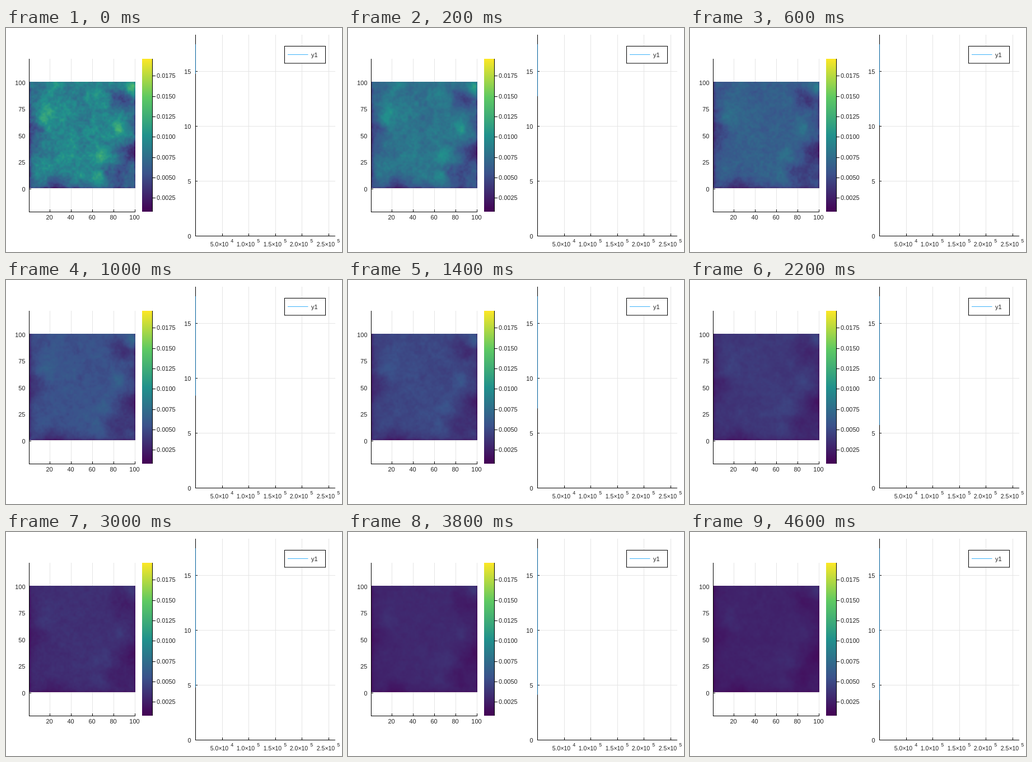
Write an HTML page with a canvas that moves like this. It is 600 by 400 pixels and loops after 4800 ms.

```html
<!DOCTYPE html>
<html lang="en">
<head>
<meta charset="utf-8">
<title>Heat map and history</title>
<style>
  html, body { margin: 0; width: 100%; height: 100%; overflow: hidden; background: #fff; }
  svg { position: absolute; left: 0; top: 0; }
  canvas { position: absolute; left: 42px; top: 96px; width: 189px; height: 190px; }
  text { font: 11px "Liberation Sans", Arial, sans-serif; fill: #222; }
  text.power { font-size: 10.5px; }
  text.exponent { font-size: 9px; }
</style>
</head>
<body>
<svg id="plot" width="600" height="400" viewBox="0 0 600 400"></svg>
<canvas id="heat" width="100" height="100"></canvas>
<script>
const STEP = 200, STEPS = 24, N = 100;
const GRID = '#e5e5e5';
const svg = document.getElementById('plot');
const ctx = document.getElementById('heat').getContext('2d');
const image = ctx.createImageData(N, N);

function add(tag, attrs, content = '', parent = svg) {
  const el = document.createElementNS('http://www.w3.org/2000/svg', tag);
  for (const key in attrs) el.setAttribute(key, attrs[key]);
  el.textContent = content;
  return parent.appendChild(el);
}
const line = (x1, y1, x2, y2, stroke = '#000') => add('line', { x1, y1, x2, y2, stroke });
const label = (x, y, content, anchor = 'start', cls = '') =>
  add('text', { x, y, 'text-anchor': anchor, class: cls }, content);
const mix = (a, b, t) => a + (b - a) * t;
const ease = t => t * t * (3 - 2 * t);

const viridis = ['#440154', '#3b528b', '#21918c', '#5ec962', '#fde725'];
const viridisRgb = viridis.map(hex => [1, 3, 5].map(i => parseInt(hex.slice(i, i + 2), 16)));

function colour(t) {
  const p = Math.min(0.9999, Math.max(0, t)) * (viridis.length - 1), i = Math.floor(p);
  return viridisRgb[i].map((c, j) => mix(c, viridisRgb[i + 1][j], p - i));
}

function drawLeftPlot() {
  for (let v = 20; v <= 100; v += 20) {
    const x = 40.5 + v * 1.9;
    line(x, 55, x, 328, GRID);
    line(x, 328, x, 324);
    label(x - 1, 342, v, 'middle');
  }
  for (let v = 0; v <= 100; v += 25) {
    const y = 287.5 - v * 1.9;
    line(42, y, 231, y, GRID);
    line(42, y, 45, y);
    label(34.5, y + 4.3, v, 'end');
  }
  line(41.5, 55, 41.5, 329);
  line(41, 328.5, 231, 328.5);
}

function drawColourBar() {
  const ramp = add('linearGradient', { id: 'ramp', x1: 0, x2: 0, y1: 1, y2: 0 });
  viridis.forEach((hex, i) =>
    add('stop', { offset: i / (viridis.length - 1), 'stop-color': hex }, '', ramp));
  add('rect', { x: 243, y: 55, width: 18, height: 273, fill: 'url(#ramp)' });
  line(261.5, 55, 261.5, 328);
  for (let i = 1; i <= 7; i++) {
    const y = Math.floor(340 - i * 36.33) + 0.5;
    line(262, y, 267, y);
    label(269, y + 3.5, (i * 0.0025).toFixed(4));
  }
}

function drawRightPlot() {
  for (let i = 1; i <= 5; i++) {
    const x = Math.round(338 + i * 47.55) + 0.5;
    line(x, 12, x, 372, GRID);
    line(x, 372, x, 367);
    label(x - 5.5, 390, (i === 1 ? '5.0' : (i / 2).toFixed(1)) + '×10', 'middle', 'power');
    label(x + 14.7, 383, i === 1 ? 4 : 5, 'start', 'exponent');
  }
  for (let v = 0; v <= 15; v += 5) {
    const y = 371.5 - v * 19.6;
    line(339, y, 588, y, GRID);
    line(339, y, 342, y);
    label(330.5, y + 4, v, 'end');
  }
  line(338.5, 12, 338.5, 372);
  line(338, 371.5, 588, 371.5);
  add('rect', { x: 497.5, y: 32.5, width: 73, height: 30.5, fill: '#fff', stroke: '#000' });
  line(503, 47.5, 539.5, 47.5, '#009af9').setAttribute('opacity', 0.75);
  label(545, 51.5, 'y1');
}

drawLeftPlot();
drawColourBar();
drawRightPlot();
const history = line(338.5, 29, 338.5, 82, '#005f9b');

function hash(x, y, z) {
  let h = Math.imul(x, 374761393) ^ Math.imul(y, 668265263) ^ Math.imul(z, 1274126177);
  h = Math.imul(h ^ (h >>> 13), 1103515245);
  h = Math.imul(h ^ (h >>> 15), 739982445);
  return ((h ^ (h >>> 16)) >>> 0) / 2147483648 - 1;
}

// Smooth noise in -1..1 over space and time.
function noise(x, y, z) {
  const i = Math.floor(x), j = Math.floor(y), k = Math.floor(z);
  const u = ease(x - i), v = ease(y - j), w = ease(z - k);
  const layer = m => mix(
    mix(hash(i, j, m), hash(i + 1, j, m), u),
    mix(hash(i, j + 1, m), hash(i + 1, j + 1, m), u), v);
  return mix(layer(k), layer(k + 1), w);
}

// Each octave halves the grain size and changes faster.
function grain(x, y, step) {
  let sum = 0;
  for (let size = 12; size > 1; size /= 2) {
    sum += 0.09 * noise(x / size, y / size, step / size + 100 * size);
  }
  return sum;
}

// Main warm and cool spots: x, y, strength.
const spots = [
  [14, 67, 0.35], [97, 96, 0.75], [68, 31, 0.28], [67, 8, 0.3], [84, 56, 0.35],
  [88, 85, -0.5], [95, 32, -0.5], [82, 13, -0.45], [3, 52, -0.3], [22, 1, -0.4]
];

function drawHeat(step, mean) {
  const contrast = 0.55 + 0.45 * Math.exp(-step / 4);
  for (let row = 0; row < N; row++) {
    for (let col = 0; col < N; col++) {
      const y = N - 1 - row;
      const wx = col + 3 * noise(col / 9, y / 9, 40);
      const wy = y + 3 * noise(col / 9, y / 9, 60);
      let relief = grain(col, y, step);
      for (const [cx, cy, strength] of spots) {
        const radius = strength > 0 ? 6 : 8;
        relief += strength * Math.exp(-((wx - cx) ** 2 + (wy - cy) ** 2) / (2 * radius ** 2));
      }
      const edge = Math.min(col, y, N - 1 - col, N - 1 - row);
      const rim = 0.18 * Math.exp(-edge / 8) + 0.25 * Math.exp(-edge * 1.5);
      const level = mean * (1.04 + contrast * relief - rim);
      image.data.set([...colour((level - 0.00085) / 0.01878), 255], (row * N + col) * 4);
    }
  }
  ctx.putImageData(image, 0, 0);
}

let shown = -1;
function render(time) {
  const step = Math.floor(time / STEP) % STEPS;
  if (step === shown) return;
  shown = step;
  const total = 14.8 * (1 + 0.2 * step) ** -0.81;
  history.setAttribute('y2', 372 - total * 19.6);
  drawHeat(step, 0.0007 + 0.00056 * total);
}

const start = performance.now();
function tick() {
  render(performance.now() - start);
  requestAnimationFrame(tick);
}
tick();
</script>
</body>
</html>
```
